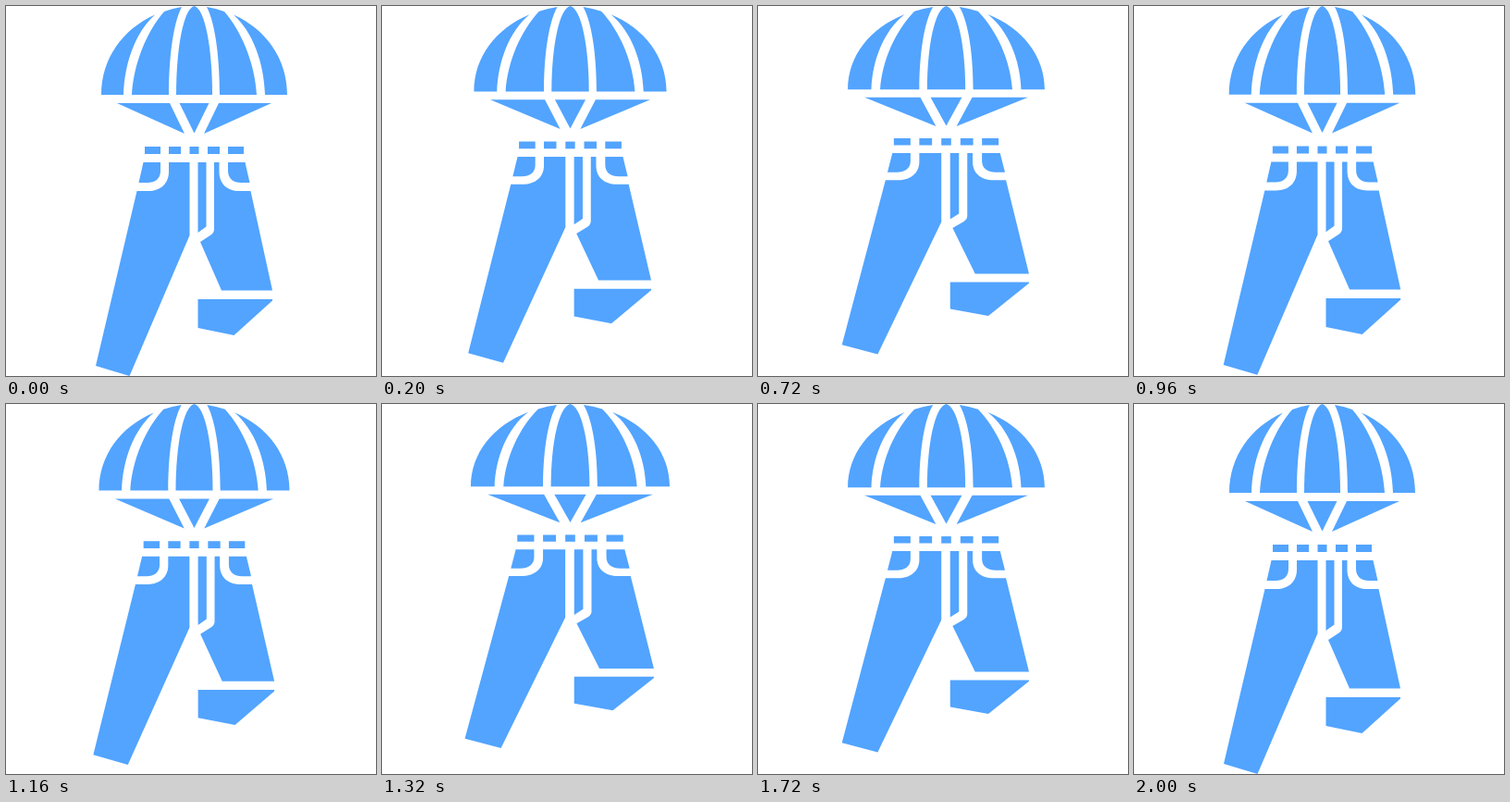
Write an HTML page that moves like this. It is 400 by 400 pixels and loops after 2800 ms.

```html
<!DOCTYPE html>
<html lang="en">
<head>
<meta charset="utf-8">
<title>Parachute jeans</title>
<style>
  html, body { margin: 0; width: 100%; height: 100%; overflow: hidden; background: #fff; }
  svg { display: block; width: 100%; height: 100%; fill: #52a4ff; }
</style>
</head>
<body>
<svg viewBox="0 0 400 400">
  <g id="figure">
    <!-- halves that repeat mirrored: canopy, cord, belt, pocket -->
    <g id="half">
      <path d="M103 96C103 57 126 25 161 9.5C140 28 128 62 127 96Z"/>
      <path d="M136 96C138 62 152 28 171 6Q180 2.500 190 1C180 20 176 60 176 96Z"/>
      <path d="M120 105H177L193 138Z"/>
      <path d="M150 152H167V160H150ZM176 152H189V160H176Z"/>
      <path d="M148.500 169H167V178C167 187 161 191 153 191H143.500Z"/>
    </g>
    <use href="#half" transform="translate(407) scale(-1 1)"/>
    <path d="M184 96C184 45 192 3 203.500 0C215 3 223 45 223 96Z"/>
    <path d="M187.500 105H219.500L203.500 137.500Z"/>
    <path d="M198.500 152H208.500V160H198.500Z"/>
    <!-- legs and fly -->
    <path d="M141.500 200H154C167 200 176 192 176 179V169H198.500V248L133.500 400L97 389Z"/>
    <path d="M207.500 169H216.500V238.500L207.500 245Z"/>
    <path d="M225 169H230.500V179C230.500 192 239 200 252 200H264.500L288 307.500H233L210 255L221.500 247.500Q225 245 225 241Z"/>
    <path d="M207.500 317H288V318.500L246.500 356L207.500 348Z"/>
  </g>
</svg>
<script>
  const figure = document.getElementById('figure');
  const LOOP = 2800, ACTIVE = 2000, BOUNCE = 1000, STEP = 40;
  const AXIS = 203.5, DEPTH = 0.1;
  const start = performance.now();

  // Gentle ease in and out: mostly sine, partly linear.
  const ease = p => 0.4 * (1 - Math.cos(Math.PI * p)) + 0.2 * p;

  // Two squash bounces hung from the top edge, then a rest.
  function draw(now) {
    const time = Math.max(0, now - start) % LOOP;
    const t = Math.min(ACTIVE, Math.floor(time / STEP) * STEP);
    const phase = t % BOUNCE / BOUNCE;
    const squash = DEPTH * ease(1 - Math.abs(1 - 2 * phase));
    figure.setAttribute('transform',
      `translate(${AXIS}) scale(${1 + squash} ${1 - squash}) translate(${-AXIS})`);
    requestAnimationFrame(draw);
  }
  draw(start);
</script>
</body>
</html>
```
